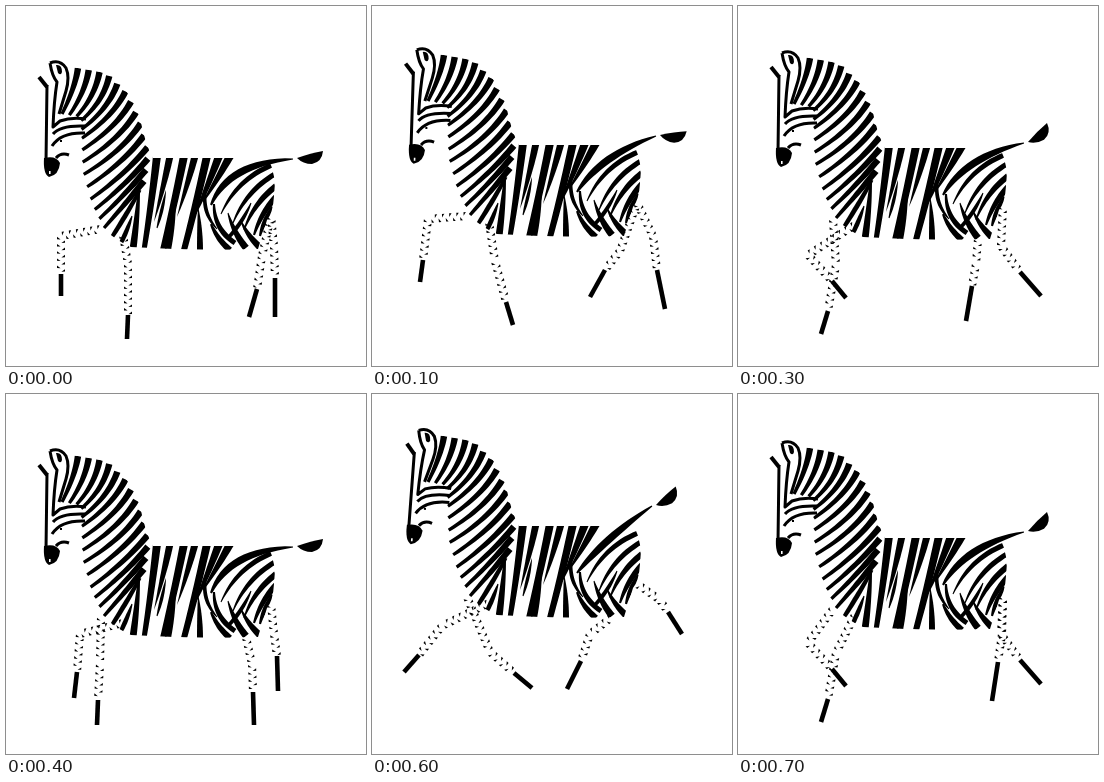
Recreate the animation shown at these times as an HTML page with a canvas. Size 360 px wide and 360 px high, loop 800 ms.

```html
<!DOCTYPE html>
<html lang="en">
<head>
<meta charset="utf-8">
<title>Trotting zebra</title>
<style>
html, body { margin: 0; width: 100%; height: 100%; overflow: hidden; background: #fff; }
canvas { display: block; width: 360px; height: 360px; }
</style>
</head>
<body>
<canvas id="stage" width="360" height="360"></canvas>
<script>
const ctx = document.getElementById('stage').getContext('2d');
const STEP = 100, STEPS = 8;

const bez = (a, b, c, t) => (1 - t) * (1 - t) * a + 2 * t * (1 - t) * b + t * t * c;

function polygon(points) {
  ctx.beginPath();
  points.forEach(p => ctx.lineTo(...p));
  ctx.fill();
}

// Curved band whose width goes from w0 through wm to w1
function band([x0, y0], [cx, cy], [x1, y1], w0, wm, w1) {
  const left = [], right = [];
  for (let i = 0; i <= 16; i++) {
    const t = i / 16;
    const x = bez(x0, cx, x1, t), y = bez(y0, cy, y1, t);
    const dx = (1 - t) * (cx - x0) + t * (x1 - cx);
    const dy = (1 - t) * (cy - y0) + t * (y1 - cy);
    const k = bez(w0, wm, w1, t) / 2 / Math.hypot(dx, dy);
    left.push([x - dy * k, y + dx * k]);
    right.unshift([x + dy * k, y - dx * k]);
  }
  polygon(left.concat(right));
}

// Stripe row: start, end, end widths, sideways bow
function stripe([x0, y0, x1, y1, w0, w1, bow = -1]) {
  const dx = x1 - x0, dy = y1 - y0, k = bow / Math.hypot(dx, dy);
  const mid = [(x0 + x1) / 2 - dy * k, (y0 + y1) / 2 + dx * k];
  band([x0, y0], mid, [x1, y1], w0, Math.max(6, (w0 + w1) / 2), w1);
}

const barrel = [
  [134, 184, 106, 231, 3, 4], [133, 184, 127, 243, 2, 7], [126, 210, 115, 237, 1, 4],
  [151, 150, 138, 244, 8, 5], [164, 150, 148, 216, 7, 0], [160, 184, 151, 222, 0, 1],
  [178, 150, 157, 244, 8, 6], [189, 150, 171, 211, 7, 0], [170, 192, 162, 244, 0, 6],
  [201, 150, 178, 244, 8, 6], [213, 150, 187, 214, 8, 0], [192, 200, 194, 244, 0, 6],
  [224, 150, 197, 196, 8, 1]
];

// The neck fans out between three guide lines
function neck() {
  const mane = [[72, 62], [100, 67], [121, 87], [134, 115], [143, 146], [138, 175]];
  const middle = [[69, 82], [95, 93], [109, 111], [116, 143], [121, 172], [120, 197]];
  const chest = [[56, 108], [75, 111], [76, 134], [77, 166], [86, 198], [98, 222]];
  const along = (pts, t) => {
    const i = Math.min(4, Math.floor(t * 5)), f = t * 5 - i;
    return pts[i].map((v, k) => v + (pts[i + 1][k] - v) * f);
  };
  for (let i = 0; i < 14; i++) {
    const [a, b, c] = [mane, middle, chest].map(g => along(g, i / 13));
    band(a, b, c, 6.5, 5.2, 3.2);
  }
}

const rump = [
  [266, 159, 215, 208, 5, 1, 14], [269, 168, 227, 217, 5, 1, 11],
  [270, 180, 238, 224, 6, 1, 8], [270, 191, 248, 229, 6, 2, 5],
  [200, 182, 211, 223, 2, 1, 11], [208, 198, 229, 237, 2, 5, 12],
  [205, 218, 224, 244, 2, 6, 4], [222, 207, 240, 242, 1, 7, 4],
  [235, 215, 256, 243, 1, 7, 4], [245, 197, 221, 233, 1, 3, -4],
  [268, 202, 254, 230, 6, 2, 4]
];

const torso = new Path2D('M62 61Q86 63 105 69Q126 87 134 112Q139 138 147 152L262 152' +
  'Q271 170 268 190Q267 207 261 214L252 243Q190 245 125 241Q95 228 83 200Q70 165 76 125L54 110Z');
const face = new Path2D('M44 57Q54 53 60 62Q64 71 60 85L53 108' +
  'M44 57Q46 70 51 76Q48 95 47 121L54 115Q65 111 80 113M41 79L40 156' +
  'M47 128Q54 119 79 120M46 140Q55 126 79 127M50 152Q55 146 63 149');
const ear = new Path2D('M50 59Q56 58 56 66Q55 70 52 67Z');
const muzzle = new Path2D('M38 152Q50 149 54 157Q53 169 43 171Q37 168 38 152Z');
const tuft = new Path2D('M0 0Q14 -5 26 -7Q25 4 15 6Q6 6 0 0Z');

function line(x0, y0, x1, y1, w) {
  ctx.lineWidth = w;
  ctx.beginPath();
  ctx.moveTo(x0, y0);
  ctx.lineTo(x1, y1);
  ctx.stroke();
}

// Short ticks on alternating edges of a limb
function ticks(x0, y0, x1, y1) {
  const len = Math.hypot(x1 - x0, y1 - y0);
  const ux = (x1 - x0) / len, uy = (y1 - y0) / len;
  for (let d = 2, side = 1; d < len - 2; d += 3.6, side = -side) {
    const x = x0 + ux * d, y = y0 + uy * d;
    const at = (o, s) => [x - uy * o * side + ux * s, y + ux * o * side + uy * s];
    polygon([at(4, -1.2), at(4, 1.2), at(0.4, 1.4)]);
  }
}

function leg(hx, hy, [kx, ky, fx, fy, tx, ty]) {
  ticks(hx, hy, kx, ky);
  ticks(kx, ky, fx, fy);
  line(fx, fy, tx, ty, 4.6);
}

// Leg pose: knee, fetlock, hoof tip
function frontLegs() {
  const reach = [70, 232, 47, 261, 32, 278], push = [118, 258, 142, 279, 160, 294];
  const fold = [70, 249, 94, 275, 108, 292], land = [98, 259, 90, 305, 83, 328];
  return [[
    [122, 258, 122, 309, 121, 333], [123, 255, 134, 296, 141, 319], push, fold,
    [74, 240, 71, 278, 68, 304], [79, 240, 73, 275, 68, 299], reach, land
  ], [
    [55, 230, 55, 268, 55, 290], [56, 213, 51, 254, 48, 276], reach, land,
    [94, 270, 92, 306, 91, 331], [98, 262, 103, 297, 107, 323], push, fold
  ]];
}

function rearLegs() {
  const reach = [218, 240, 209, 267, 195, 295], kick = [263, 240, 282, 266, 303, 290];
  return [[
    [268, 240, 269, 272, 269, 311], [281, 230, 285, 264, 293, 303],
    [288, 203, 302, 221, 324, 247], kick,
    [268, 240, 271, 262, 272, 297], [262, 228, 253, 243, 242, 275],
    reach, [264, 240, 260, 268, 254, 307]
  ], [
    [256, 250, 251, 283, 243, 311], [248, 245, 233, 264, 218, 291],
    reach, [238, 258, 234, 280, 228, 315],
    [246, 270, 247, 298, 248, 331], [262, 248, 278, 268, 299, 291],
    [288, 206, 296, 218, 310, 240], kick
  ]];
}

const front = frontLegs(), rear = rearLegs();

function head(turn) {
  ctx.save();
  ctx.translate(55, 101);
  ctx.rotate(turn * Math.PI / 180);
  ctx.translate(-55, -101);
  ctx.lineWidth = 3;
  ctx.stroke(face);
  line(33, 71, 41, 81, 4);
  ctx.fill(ear);
  ctx.fill(muzzle);
  ctx.fillRect(54, 134, 2, 2);
  ctx.fillStyle = '#fff';
  ctx.fillRect(43, 165, 1.6, 3);
  ctx.restore();
}

function tail(lift, x, y, turn) {
  band([205, 199 + lift], [222 - lift / 2, 157 + lift * 0.6], [x - 4, y + 1], 2, 13, 1.2);
  ctx.save();
  ctx.translate(x, y);
  ctx.rotate(turn * Math.PI / 180);
  ctx.fill(tuft);
  ctx.restore();
}

// Body lift, tuft position and turn
const rest = [0, 291, 152, 0];
const poses = [
  rest, [-13, 288, 129, 7], [-21, 284, 110, -28], [-10, 290, 136, -30],
  rest, [-9, 288, 130, -2], [-20, 284, 111, -28], [-8, 290, 137, -30]
];

function draw(n) {
  const lift = poses[n][0];
  ctx.fillStyle = '#fff';
  ctx.fillRect(0, 0, 360, 360);
  ctx.fillStyle = ctx.strokeStyle = '#000';
  ctx.lineJoin = 'round';

  front.forEach((rows, i) => leg(i ? 95 : 117, (i ? 223 : 229) + lift, rows[n]));
  rear.forEach(rows => {
    const low = rows[n][0] < 247;
    leg(low ? 240 : 265, (low ? 243 : 210) + lift, rows[n]);
  });

  ctx.save();
  ctx.translate(0, lift);
  head(Math.max(0, -lift - 10) * 0.35);
  ctx.clip(torso);
  neck();
  barrel.concat(rump).forEach(stripe);
  ctx.restore();
  tail(...poses[n]);
}

let shown = -1;
const start = performance.now();
function tick(now) {
  const n = Math.floor(Math.max(0, now - start) / STEP) % STEPS;
  if (n !== shown) draw(shown = n);
  requestAnimationFrame(tick);
}
tick(start);
</script>
</body>
</html>
```
